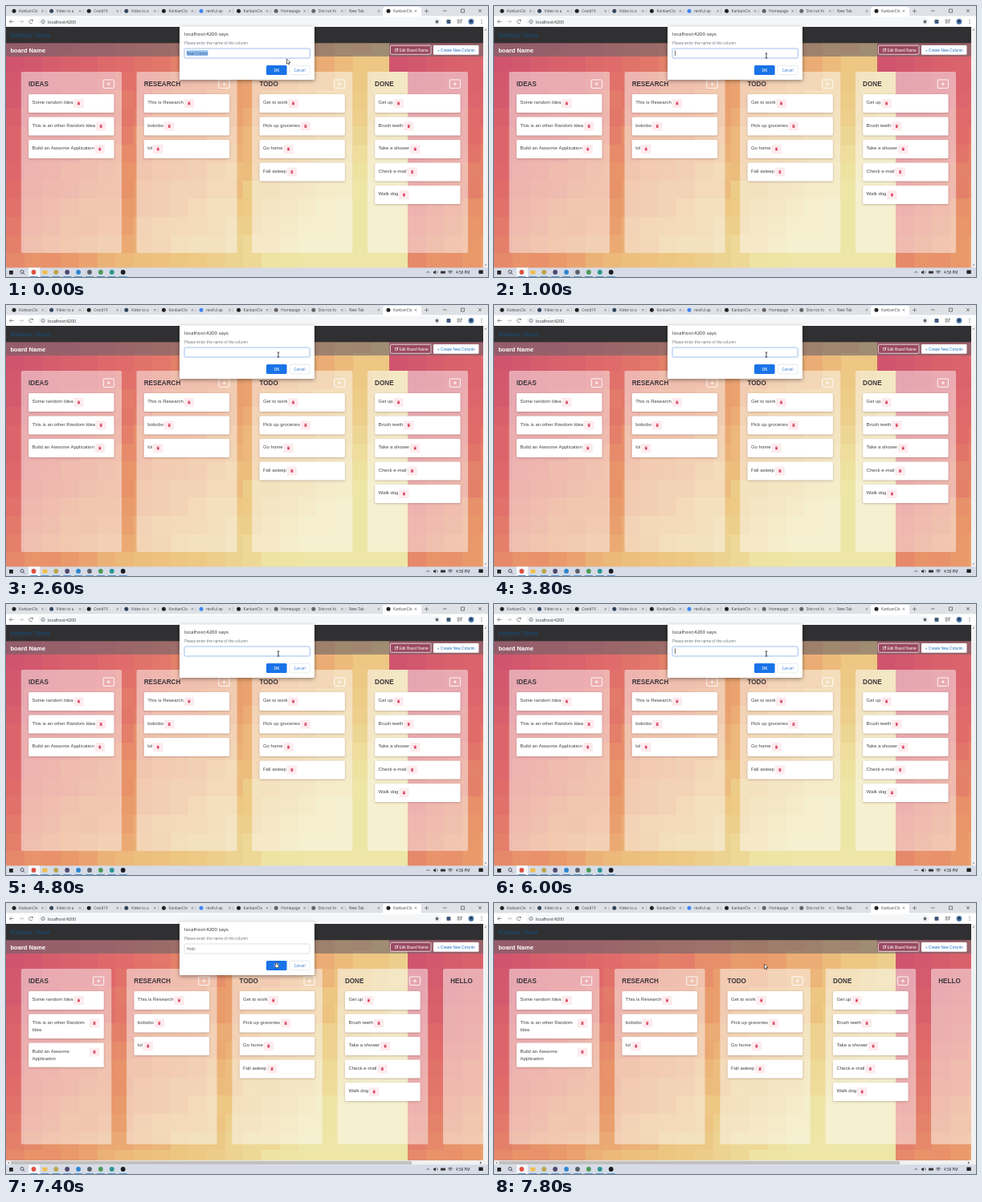
Recreate the animation shown at these times as an HTML page with a canvas. Size 600 px wide and 338 px high, loop 8000 ms.

```html
<!DOCTYPE html>
<html lang="en">
<head>
<meta charset="utf-8">
<title>Kanban board</title>
<style>
html, body { margin: 0; width: 100%; height: 100%; overflow: hidden; background: #fff; }
canvas { display: block; width: 600px; height: 338px; }
</style>
</head>
<body>
<canvas id="stage"></canvas>
<script>
const W = 600, H = 338, LOOP = 8000, STEP = 200;
const UI = '"Open Sans", "Noto Sans", sans-serif';
const PAGE = '"Liberation Sans", Arial, sans-serif';
const canvas = document.getElementById('stage');
const ctx = canvas.getContext('2d');
const scale = window.devicePixelRatio || 1;
canvas.width = W * scale;
canvas.height = H * scale;

const BOARD = [
  ['IDEAS', 'Some random Idea', 'This is an other Random Idea', 'Build an Awsome Application'],
  ['RESEARCH', 'This is Research', 'bobobo', 'lol'],
  ['TODO', 'Get to work', 'Pick up groceries', 'Go home', 'Fall asleep'],
  ['DONE', 'Get up', 'Brush teeth', 'Take a shower', 'Check e-mail', 'Walk dog']
];
const TABS = ['KanbanClo', 'Video to a', 'Covid19', 'Video to a', 'KanbanClo', 'restful ap',
  'KanbanClo', 'Homepage', 'Site not fo', 'New Tab', 'KanbanClo'];
const TAB_ICONS = ['#222', '#34465c', '#222', '#34465c', '#222', '#4285f4',
  '#222', '#666', '#666', null, '#222'];
const TASK_ICONS = ['#de5145', '#f2bd4b', '#b8a54a', '#51466f', '#2d86cf', '#596068',
  '#4b9a55', '#2a9690', '#1c1c1f'];
const RAMP = [[208, 84, 110], [224, 108, 106], [233, 152, 106], [237, 198, 130], [238, 230, 166]];

function rect(x, y, w, h, fill) {
  ctx.fillStyle = fill;
  ctx.fillRect(x, y, w, h);
}

function box(x, y, w, h, r, fill, stroke, line = 0.7) {
  ctx.beginPath();
  ctx.roundRect(x, y, w, h, r);
  if (fill) { ctx.fillStyle = fill; ctx.fill(); }
  if (stroke) { ctx.strokeStyle = stroke; ctx.lineWidth = line; ctx.stroke(); }
}

function text(str, x, y, size, color, family = UI, weight = 400, align = 'left') {
  ctx.font = `${weight} ${size}px ${family}`;
  ctx.fillStyle = color;
  ctx.textAlign = align;
  ctx.fillText(str, x, y);
}

function dot(x, y, r, color) {
  ctx.beginPath();
  ctx.arc(x, y, r, 0, 7);
  ctx.fillStyle = color;
  ctx.fill();
}

function ring(x, y, r, color, from = 0, to = 7) {
  ctx.beginPath();
  ctx.arc(x, y, r, from, to);
  ctx.strokeStyle = color;
  ctx.lineWidth = 0.7;
  ctx.stroke();
}

// pts is a flat x, y list
function trace(pts) {
  ctx.beginPath();
  for (let i = 0; i < pts.length; i += 2) ctx.lineTo(pts[i], pts[i + 1]);
}

function line(pts, color, width = 0.7) {
  trace(pts);
  ctx.strokeStyle = color;
  ctx.lineWidth = width;
  ctx.stroke();
}

function poly(pts, fill) {
  trace(pts);
  ctx.closePath();
  ctx.fillStyle = fill;
  ctx.fill();
}

function cross(x, y, r, color) {
  line([x - r, y - r, x + r, y + r], color, 0.6);
  line([x + r, y - r, x - r, y + r], color, 0.6);
}

function withShadow(color, blur, dy, draw) {
  ctx.save();
  ctx.shadowColor = color;
  ctx.shadowBlur = blur * scale;
  ctx.shadowOffsetY = dy * scale;
  draw();
  ctx.restore();
}

function hash(i, j) {
  const n = Math.sin(i * 127.1 + j * 311.7) * 43758.5453;
  return n - Math.floor(n);
}

function rampColor(t) {
  const p = Math.max(0, Math.min(0.9999, t)) * (RAMP.length - 1);
  const k = Math.floor(p);
  return `rgb(${RAMP[k].map((v, i) => Math.round(v + (RAMP[k + 1][i] - v) * (p - k)))})`;
}

// mosaic that repeats sideways; the top rows repeat one block sooner
function mosaic(topRows) {
  const bw = 500 / 22, bh = 22.6, top = 14.4;
  for (let j = 0; j < 14; j++) {
    const period = j < topRows ? 21 : 22;
    const y = Math.round(top + j * bh);
    const h = Math.round(top + (j + 1) * bh) - y;
    for (let i = 0; i < 27; i++) {
      const c = i % period;
      const t = 0.8 * c / 21 + 0.42 * (j - 2) / 11 + (hash(c, j) - 0.5) * 0.07;
      const x = Math.round(i * bw);
      rect(x, y, Math.round((i + 1) * bw) - x, h, rampColor(t));
    }
  }
}

function tabStrip() {
  const grey = '#5f6368';
  rect(0, 0, W, 13, '#dee1e6');
  box(469, 1, 48, 14, 3, '#fff');
  TABS.forEach((name, i) => {
    const last = i === TABS.length - 1;
    const x = last ? 476 : 10 + i * 46.6;
    const icon = TAB_ICONS[i];
    if (icon) dot(x, 6.3, 2.5, icon);
    text(name, icon ? x + 6 : 427, 8.1, 4.7, '#45484d');
    cross(last ? 510 : icon ? x + 35.5 : 464, 6.3, 1.3, grey);
    if (i < 9) rect(x + 39.5, 4, 0.5, 5, '#a8acb2');
  });
  line([521, 6.3, 526, 6.3], grey);
  line([523.5, 3.8, 523.5, 8.8], grey);
  line([544, 6, 548.5, 6], '#333', 0.6);
  box(566.5, 4, 4, 4, 0, null, '#333', 0.6);
  cross(590, 6, 2, '#333');
}

function toolbar() {
  const grey = '#5f6368';
  rect(0, 12.5, W, 13.5, '#fff');
  box(40, 14, 502, 11, 5.5, '#f5f6f7');
  for (const [x, d, c] of [[7, -1, grey], [19, 1, '#b5b8bc']]) {
    line([x - 2.5, 19.5, x + 2.5, 19.5], c);
    line([x + d * 0.4, 17.3, x + d * 2.6, 19.5, x + d * 0.4, 21.7], c);
  }
  ring(31, 19.5, 2.3, grey, 0.4, 5.7);
  rect(32, 17, 1.6, 1.6, grey);
  ring(46, 19.5, 2.1, grey);
  rect(45.7, 19, 0.6, 1.7, grey);
  text('localhost:4200', 52, 21.5, 5.2, '#2b2d30');
  const star = [];
  for (let k = 0; k < 10; k++) {
    const r = k % 2 ? 1.4 : 3, a = k * Math.PI / 5 - Math.PI / 2;
    star.push(536.5 + r * Math.cos(a), 19.6 + r * Math.sin(a));
  }
  poly(star, grey);
  box(548.5, 17, 5, 5, 1, '#41597a');
  for (const y of [17.4, 19.2, 21]) line([561.5, y, 565, y], '#333', 0.6);
  line([566.3, 21.5, 566.3, 17.3, 568, 17.3], '#333', 0.7);
  dot(579, 19.5, 3.4, '#4879ae');
  dot(579, 18.9, 1.7, '#27384c');
  for (const y of [17.4, 19.5, 21.6]) dot(592, y, 0.6, grey);
}

function pageHeader() {
  rect(0, 26, W, 20.5, '#303032');
  text('Kanban Clone', 5, 39.4, 7.9, '#12507f', PAGE);
  rect(0, 46.5, W, 16.5, 'rgba(105,100,105,.58)');
  text('board Name', 5.5, 57.6, 7.55, '#fff', PAGE, 700);
  box(478.5, 49.3, 50.5, 11, 1.2, 'rgba(160,50,85,.45)', '#fff');
  box(484.3, 53.3, 3.2, 3.4, 0.5, null, '#fff', 0.6);
  line([486, 55, 488.3, 52.6], '#fff', 0.8);
  text('Edit Board Name', 489.5, 56.6, 4.75, '#fff', PAGE);
  box(532, 49, 56.5, 11.7, 1.2, '#fff');
  text('+ Create New Column', 560.3, 56.6, 4.75, '#1f6fc0', PAGE, 400, 'center');
}

function wrap(str, max) {
  ctx.font = `6px ${PAGE}`;
  const lines = [''];
  for (const word of str.split(' ')) {
    const k = lines.length - 1;
    const next = lines[k] ? lines[k] + ' ' + word : word;
    if (ctx.measureText(next).width > max && lines[k]) lines.push(word);
    else lines[k] = next;
  }
  return lines;
}

function card(str, x, y, w) {
  const lines = wrap(str, w - 21);
  const h = lines.length > 1 ? 30.4 : 23;
  withShadow('rgba(70,30,30,.3)', 2.5, 0.8, () => box(x, y, w, h, 1.5, '#fff'));
  lines.forEach((l, i) => text(l, x + 4.4, y + 12.2 + i * 9, 6, '#444', PAGE));
  const bx = lines.length > 1 ? x + w - 18 : x + 5.2 + ctx.measureText(str).width;
  box(bx, y + 6, 12.4, 11, 1.2, '#fdebee');
  const red = '#d83a58';
  rect(bx + 4.6, y + 9.8, 3.2, 0.7, red);
  rect(bx + 5.5, y + 9.4, 1.4, 0.4, red);
  rect(bx + 4.9, y + 10.8, 2.6, 2.5, red);
  return h + 5.5;
}

function column([title, ...cards], x, w, bottom) {
  box(x, 82, w, bottom - 82, 2, 'rgba(250,250,250,.48)');
  text(title, x + 9.2, 100.3, 8.15, '#3d373b', PAGE, 700);
  const bx = x + w - 22.8;
  box(bx, 92, 13.2, 10.4, 0.8, null, '#fff', 0.9);
  line([bx + 4.6, 97.2, bx + 8.6, 97.2], '#fff', 0.9);
  line([bx + 6.6, 95.2, bx + 6.6, 99.2], '#fff', 0.9);
  let y = 110;
  for (const c of cards) y += card(c, x + 9.3, y, w - 18.8);
}

function scrollbars(wide) {
  const arrow = '#8a8a8a';
  rect(594, 26, 6, 301, '#f1f1f1');
  poly([595.6, 30.5, 598.4, 30.5, 597, 28.7], arrow);
  if (!wide) {
    poly([595.6, 322.5, 598.4, 322.5, 597, 324.3], arrow);
    return;
  }
  rect(0, 321, W, 6, '#f1f1f1');
  rect(6, 321.7, 499, 4.6, '#c1c1c1');
  poly([4, 322.5, 4, 325.5, 2, 324], arrow);
  poly([590, 322.5, 590, 325.5, 592, 324], '#555');
}

function taskbar() {
  rect(0, 326.4, W, 11.6, '#d6dbe6');
  rect(4, 330, 4.8, 4.8, '#222');
  ring(20, 331.5, 2, '#222');
  line([21.4, 333, 23, 334.8], '#222');
  rect(28, 326.4, 14, 11.6, '#f6f8fb');
  TASK_ICONS.forEach((c, i) => {
    const x = 34.5 + i * 13.9;
    if (i === 1) box(x - 3, 329.8, 6, 4.8, 0.5, c);
    else dot(x, 332, 2.9, c);
    rect(x - 5, 337, 10, 1, '#5b9bd5');
  });
  line([523.4, 333, 525.4, 331, 527.4, 333], '#333');
  poly([532, 331, 533.4, 331, 535, 329.6, 535, 334.6, 533.4, 333.2, 532, 333.2], '#333');
  ring(535, 332, 2, '#333', -0.8, 0.8);
  rect(541, 330.6, 6, 3, '#333');
  for (const r of [1.5, 3, 4.4]) ring(553, 334.6, r, '#333', -2.36, -0.78);
  text('4:58 PM', 560, 333.9, 4.7, '#222');
  box(588.4, 329.6, 5.4, 4.4, 0.4, '#222');
}

function dialog(state) {
  ctx.save();
  ctx.translate(0, state.closing ? -2 : 0);
  withShadow('rgba(0,0,0,.4)', 5, 1.5, () => box(216, 25.5, 168, 66.5, 1.5, '#fff'));
  text('localhost:4200 says', 222, 37.2, 6.1, '#25272b');
  text('Please enter the name of the column', 222, 47.8, 4.6, '#6b6f75');
  box(222, 53, 156.3, 12, 1.6, '#fff', state.closing ? '#d5d8dc' : '#86aeea', 0.8);
  if (state.selected) rect(224.8, 55.3, 26.6, 7, '#94bfee');
  text(state.value, 225, 60.6, 4.4, state.selected ? '#2a5488' : '#555');
  if (state.caret) rect(225.2 + ctx.measureText(state.value).width, 55.4, 0.7, 6.8, '#333');
  box(324, 74, 25.6, 12, 1.5, '#1a73e8');
  text('OK', 336.8, 81.7, 4.7, '#fff', UI, 600, 'center');
  box(353, 74.2, 25, 11.6, 1.5, '#fff', '#dadce0', 0.6);
  text('Cancel', 365.5, 81.7, 4.6, '#2f73d0', UI, 400, 'center');
  ctx.restore();
}

const pointers = {
  arrow() {
    poly([0, 0, 0, 6.2, 1.4, 4.9, 2.4, 7, 3.4, 6.5, 2.5, 4.5, 4.4, 4.4], '#fff');
    ctx.strokeStyle = '#111';
    ctx.lineWidth = 0.6;
    ctx.closePath();
    ctx.stroke();
  },
  beam() {
    line([-1.3, -3, 1.3, -3], '#111', 0.7);
    line([0, -3, 0, 3], '#111', 0.8);
    line([-1.3, 3, 1.3, 3], '#111', 0.7);
  },
  hand() {
    box(-0.7, -3.4, 1.4, 5, 0.7, '#fff', '#111', 0.7);
    box(-1.7, -0.5, 4.4, 4, 1.2, '#fff', '#111', 0.7);
    box(-0.4, -2.8, 0.9, 4, 0.4, '#fff');
  }
};

function pointerAt(t) {
  if (t < 200) return ['arrow', 349.5, 66];
  if (t < 400) return ['beam', 344, 64];
  if (t < 7000) return ['beam', 339, 62];
  if (t < 7200) return ['arrow', 337.5, 68];
  if (t < 7600) return ['hand', 336.8, 77.3];
  return ['arrow', 336.5, 76];
}

function valueAt(t) {
  if (t < 400) return 'New Column';
  return 'Hello'.slice(0, Math.max(0, Math.min(5, (t - 6200) / 100)));
}

function render(t) {
  ctx.setTransform(scale, 0, 0, scale, 0, 0);
  const added = t >= 7400;
  mosaic(added ? 2 : 3);
  pageHeader();
  const columns = added ? [...BOARD, ['HELLO']] : BOARD;
  const [w, pitch, bottom] = added ? [112.5, 131.3, 301] : [125.2, 143.7, 308];
  columns.forEach((c, i) => column(c, 18.8 + i * pitch, w, bottom));
  scrollbars(added);
  taskbar();
  tabStrip();
  toolbar();
  if (t < 7600) {
    dialog({
      value: valueAt(t),
      selected: t < 400,
      caret: t >= 400 && !added && (t > 6200 || t % 1000 < 500),
      closing: added
    });
  }
  const [kind, x, y] = pointerAt(t);
  ctx.save();
  ctx.translate(x, y);
  pointers[kind]();
  ctx.restore();
}

const start = performance.now();
function tick() {
  const t = (performance.now() - start) % LOOP;
  render(Math.floor(t / STEP) * STEP);
  requestAnimationFrame(tick);
}
tick();
</script>
</body>
</html>
```
